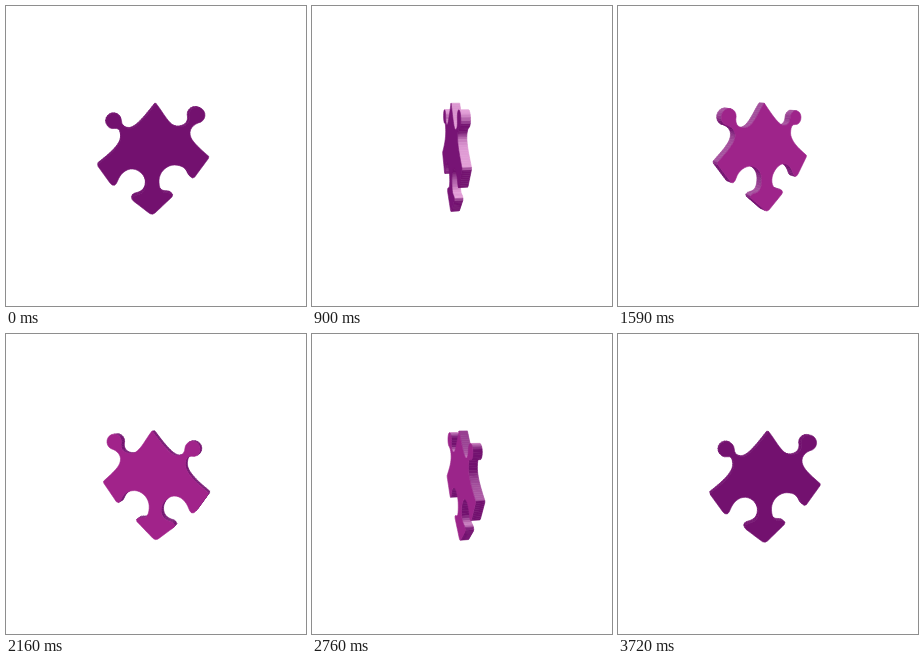
An HTML page for the animation above (3750 ms loop, 300 by 300 pixels).

```html
<!DOCTYPE html>
<html lang="en">
<head>
<meta charset="utf-8">
<title>Turning puzzle piece</title>
<style>
html, body { margin: 0; width: 100%; height: 100%; overflow: hidden; background: #fff; }
svg { display: block; width: 100vw; height: 100vh; }
polygon { stroke-width: .6; stroke-linejoin: round; }
</style>
</head>
<body>
<svg id="stage" viewBox="0 0 300 300"></svg>
<script>
const NS = 'http://www.w3.org/2000/svg';
const LOOP = 3750, FRAMES = 100, COUNT = 200;
const CX = 147.4, CY = 152, DIST = 390, DEPTH = 8.5;
const TILT = 0.19, START = -7.5 * Math.PI / 180;
// Face colours seen straight on and edge-on.
const FRONT = [[114, 16, 110], [119, 20, 117]];
const BACK = [[163, 34, 138], [155, 37, 138]];
const SHADE = [114, 18, 111], PINK = [232, 166, 220];
const LIGHT = [0.45, -0.89];

// Outline of the front face as it appears at the starting angle.
const OUTLINE =
  'M150 97.5C158 107 164 122 174 121S184 113 183 109A8 8 0 1 1 192 117' +
  'S184 120 184 127S191 140 203.5 151L188 172Q185 173 183 168' +
  'C180 161 174 159 168 159S153 165 153 175S157 187 161 187Q167 187 167 190' +
  'L149 207Q146 209.5 143 207L126 194Q126 190 131 189C140 187 141 180 140 175' +
  'S133 163 126 163S114 169 112 174S108 182 104 177L91 159' +
  'C101 151 116 140 115 130S110 123 105 122.5A7.8 7.8 0 1 1 115.5 115.5' +
  'S116 122 123 122.5S140 110 150 97.5Z';

const stage = document.getElementById('stage');
const clamp = v => Math.max(0, Math.min(1, v));
const mix = (a, b, k) => a.map((v, i) => v + (b[i] - v) * k);
const rgb = c => `rgb(${c.map(Math.round).join()})`;

// Turn about the vertical axis, tip towards the viewer, apply perspective.
function project(x, y, z, angle) {
  const c = Math.cos(angle), s = Math.sin(angle);
  const near = x * s + z * c;
  const depth = near * Math.cos(TILT) - y * Math.sin(TILT);
  const k = DIST / (DIST - depth);
  return [
    CX + (x * c - z * s) * k,
    CY + (y * Math.cos(TILT) + near * Math.sin(TILT)) * k,
    depth
  ];
}

// Find the model point that lands on a given stage point.
function lift(px, py) {
  let x = 0, y = 0;
  for (let i = 0; i < 20; i++) {
    const p = project(x, y, DEPTH, START);
    x += px - p[0];
    y += py - p[1];
  }
  return [x, y];
}

function area(pts) {
  return pts.reduce((sum, p, i) => {
    const q = pts[(i + 1) % pts.length];
    return sum + p[0] * q[1] - q[0] * p[1];
  }, 0);
}

const path = document.createElementNS(NS, 'path');
path.setAttribute('d', OUTLINE);
const total = path.getTotalLength();
const shape = Array.from({ length: COUNT }, (_, i) => {
  const p = path.getPointAtLength(total * i / COUNT);
  return lift(p.x, p.y);
});
// How strongly each side wall is lit from the upper right of the piece.
const lit = shape.map((p, i) => {
  const q = shape[(i + 1) % COUNT];
  const dx = q[0] - p[0], dy = q[1] - p[1], len = Math.hypot(dx, dy) || 1;
  return clamp(0.15 + 0.85 * (dy * LIGHT[0] - dx * LIGHT[1]) / len);
});
const pool = Array.from({ length: COUNT + 2 }, () =>
  stage.appendChild(document.createElementNS(NS, 'polygon')));

function draw(angle) {
  const edge = Math.abs(Math.sin(angle));
  const front = shape.map(p => project(p[0], p[1], DEPTH, angle));
  const back = shape.map(p => project(p[0], p[1], 0, angle));
  const faces = [];
  for (let i = 0; i < COUNT; i++) {
    const j = (i + 1) % COUNT;
    const pts = [front[i], back[i], back[j], front[j]];
    if (area(pts) <= 0) continue;
    const z = pts.reduce((sum, p) => sum + p[2], 0);
    faces.push({ pts, z, color: mix(SHADE, PINK, lit[i] * edge ** 1.5) });
  }
  faces.sort((a, b) => a.z - b.z);
  if (area(front) > 0) faces.push({ pts: front, color: mix(...FRONT, edge) });
  if (area(back) < 0) faces.push({ pts: back, color: mix(...BACK, edge) });

  pool.forEach((el, i) => {
    const f = faces[i];
    el.style.display = f ? '' : 'none';
    if (!f) return;
    el.setAttribute('points', f.pts.map(p => p[0].toFixed(2) + ',' + p[1].toFixed(2)).join(' '));
    const color = rgb(f.color);
    el.setAttribute('fill', color);
    el.setAttribute('stroke', color);
  });
}

// Four steps per 150 ms: one of 60 ms, then three of 30 ms.
function stepAt(t) {
  const rest = t % 150;
  return 4 * Math.floor(t / 150) + Math.max(0, Math.floor(rest / 30) - 1);
}

let begin = null;
function tick(now) {
  if (begin === null) begin = now;
  draw(START + 2 * Math.PI * stepAt((now - begin) % LOOP) / FRAMES);
  requestAnimationFrame(tick);
}
draw(START);
requestAnimationFrame(tick);
</script>
</body>
</html>
```
